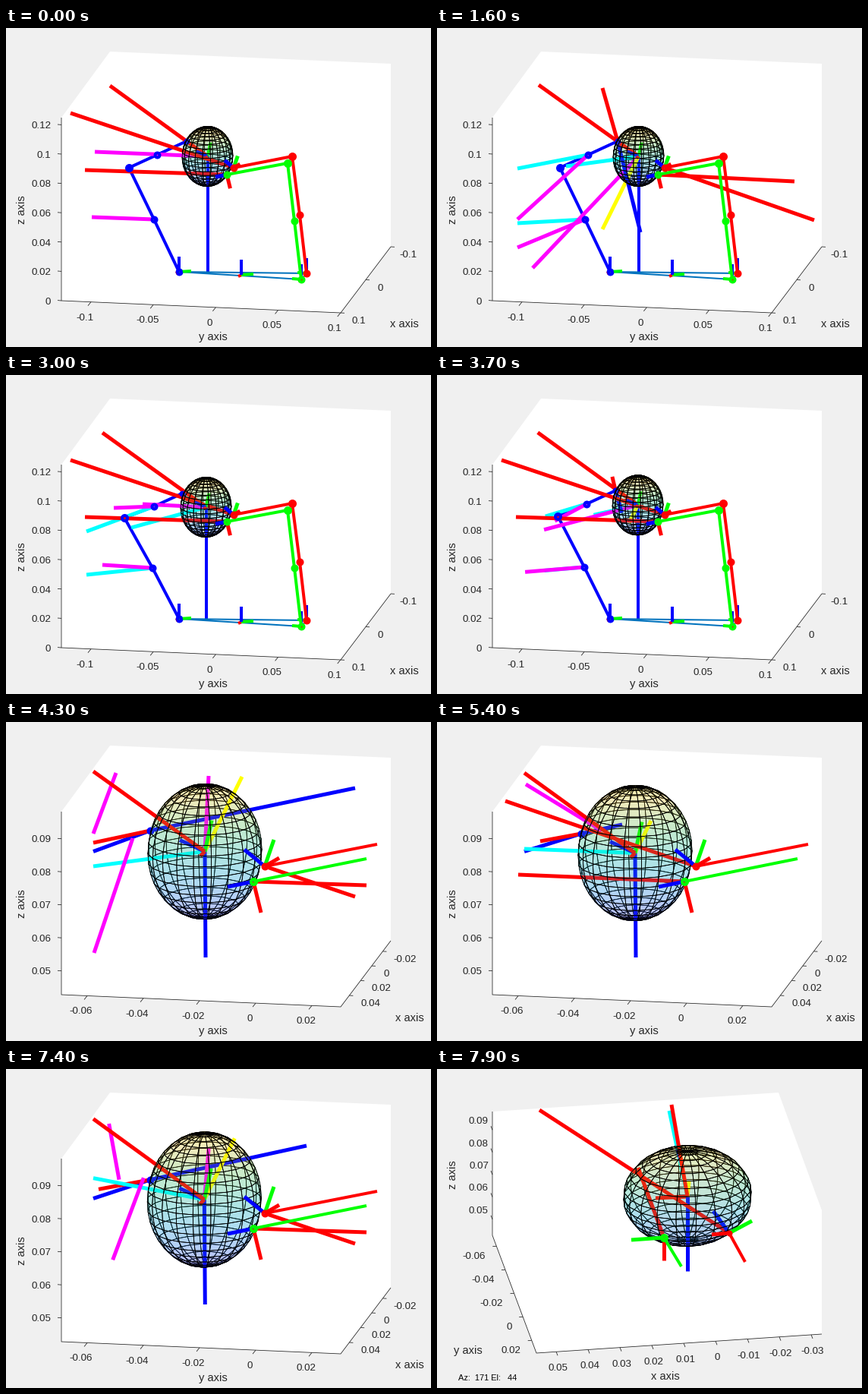
Recreate the animation shown at these times as a matplotlib script. Size 560x420 px, loop 8000 ms.

```python
import numpy as np
import matplotlib.pyplot as plt
from matplotlib.animation import FuncAnimation
from matplotlib.collections import PolyCollection
from matplotlib.lines import Line2D

W, H, DPI = 560, 420, 100
STEP, FRAMES = 100, 80
PX = 72 / DPI
INK = "#262626"
RED, GREEN, BLUE = "#ff0000", "#00ff00", "#0000ff"
MAG, CYAN, YEL, BASE = "#ff00ff", "#00ffff", "#ffff00", "#0072bd"
BACK, INSIDE, FRONT, TOP = 2, 3, 4, 5

plt.rcParams["font.family"] = "Liberation Sans"
fig = plt.figure(figsize=(W / DPI, H / DPI), dpi=DPI, facecolor="#f0f0f0")
ax = fig.add_axes([0, 0, 1, 1])

# time, strain of the vectors, side of the two cable pulls
KEYS = np.array([
    (500, 0, 0), (900, 1, 1), (1300, 0, 0), (1600, 1, 1), (2000, 0, 0),
    (2500, 1, 1), (3000, 0, 0), (3400, 1, 1), (3800, 0, 0), (4300, 1, 1),
    (4800, 0, 0), (5100, 1, 1), (5400, 0, 0), (5900, 1, 1), (6300, 0, 0),
    (6700, 1, 0), (7200, 0, 0), (7500, 1, 1), (7700, 0, 0)])
SAG = [(500, 1600, 3000, 4300, 5400, 6700, 7700), (0, 0, 1, 0, 1, 0, 1)]


def lerp(a, b, k):
    return np.asarray(a, float) * (1 - k) + np.asarray(b, float) * k


def seg(color, p, q, w=5, z=INSIDE):
    if np.hypot(p[0] - q[0], p[1] - q[1]) > 1:
        ax.add_line(Line2D([p[0], q[0]], [p[1], q[1]], color=color, lw=w * PX,
                           zorder=z, solid_capstyle="butt"))


def chain(color, pts, w=4, z=TOP):
    x, y = np.transpose(pts)
    ax.add_line(Line2D(x, y, color=color, lw=w * PX, zorder=z,
                       solid_capstyle="butt"))


def ring(color, p, d=6, z=TOP):
    ax.add_line(Line2D([p[0]], [p[1]], marker="o", ms=d * PX, mfc="none",
                       mec=color, mew=4 * PX, zorder=z))


def triad(p, arms, scale=1.0, w=5, z=TOP):
    for color, dx, dy in arms:
        seg(color, p, (p[0] + dx * scale, p[1] + dy * scale), w, z)


def label(x, y, s, ha="center", size=13.33, **kw):
    ax.text(x, y, s, ha=ha, va="baseline", fontsize=size * PX,
            color=kw.pop("color", INK), **kw)


def tick(x, y, dx, dy):
    seg(INK, (x, y), (x + dx, y + dy), 0.8, 1)


def box(corners, edge):
    ax.add_patch(plt.Polygon(corners, fc="white", ec="none", zorder=0))
    chain(INK, edge, 0.8, 1)


def axis_names(x, y, z):
    label(*x, "x axis", size=14.67)
    label(*y, "y axis", size=14.67)
    label(*z, "z axis", size=14.67, rotation=90, rotation_mode="anchor")


# unit sphere mesh
N = 20
LON, LAT = np.meshgrid(np.linspace(-np.pi, np.pi, N + 1),
                       np.linspace(-np.pi / 2, np.pi / 2, N + 1))
BALL = np.stack([np.cos(LAT) * np.cos(LON), np.cos(LAT) * np.sin(LON),
                 np.sin(LAT)], -1)
STOPS = [(.24, .15, .66), (.28, .36, .95), (.13, .6, .9), (.1, .75, .7),
         (.5, .8, .35), (.99, .75, .23), (.98, .95, .1)]
LEVEL = np.repeat(np.linspace(0, 1, N), N)
TINT = np.stack([np.interp(LEVEL, np.linspace(0, 1, len(STOPS)), c)
                 for c in np.transpose(STOPS)] + [np.full(N * N, .2)], -1)


def sphere(center, ex, ey, ez):
    p = BALL @ np.array([ex, ey, ez], float) + center
    quads = np.stack([p[:-1, :-1], p[:-1, 1:], p[1:, 1:], p[1:, :-1]], 2)
    quads = quads.reshape(-1, 4, 2)
    a, b = quads[:, 2] - quads[:, 0], quads[:, 3] - quads[:, 1]
    near = a[:, 0] * b[:, 1] - a[:, 1] * b[:, 0] < 0
    for mask, z in ((~near, BACK), (near, FRONT)):
        ax.add_collection(PolyCollection(
            quads[mask], facecolors=TINT[mask], edgecolors="none",
            antialiaseds=False, zorder=z), autolim=False)
        ax.add_collection(PolyCollection(
            quads[mask], facecolors="none", edgecolors="black",
            linewidths=.8 * PX, zorder=z + .1), autolim=False)


SIDE_BOX = [(73, 118), (137, 31), (507, 47), (507, 288), (441, 375), (73, 359)]
SIDE_EDGE = [(73, 118), (73, 359), (441, 375), (507, 288)]
R_ARMS = [(BLUE, -27, -22), (GREEN, 12, -35), (RED, 19, -11)]
G_ARMS = [(BLUE, -34, 7), (RED, 10, 41)]
C_ARMS = [(GREEN, 9, -41), (BLUE, -33, -15), (RED, -6, 6)]


def side_axes(zs, z0, kz, ys, y0, ky, xs, xname):
    """zs, ys: tick values; z0, y0: limits at the corner; xs: value, edge share, label x."""
    box(SIDE_BOX, SIDE_EDGE)
    for v in zs:
        y = 359 - (v - z0) * kz
        tick(73, y, -5, -.4)
        label(59, y + 4.8, f"{v:g}", "right")
    for v in ys:
        x = 73 + (v - y0) * ky
        y = 359 + (x - 73) * 16 / 368
        tick(x, y, -4, 5)
        label(x - 8, y + 24, f"{v:g}")
    for v, k, lx in xs:
        x, y = lerp((441, 375), (507, 288), k)
        tick(x, y, 5, .3)
        label(lx, y + 14, f"{v:g}", "left")
    axis_names((xname, 394), (273, 411), (25, 239))


def whole_arm(t, s, left, q):
    side_axes(np.arange(7) * .02, 0, 1930, (-.1, -.05, 0, .05, .1), -.1237,
              1644, [(.1, 0, 456), (0, .5, 489), (-.1, 1, 518)], 525)
    c = lerp((265.5, 169), (263.5, 174), q)
    sphere(c, (-6.6, 8.7), (33, 1.4), (0, -38.6))

    n1 = lerp((238, 149), (232, 156), q)
    n2 = lerp((199, 167), (195, 173), q)
    n3 = lerp((162, 184), (156, 188), q)
    n4 = lerp((195, 252), (193, 254), q)
    foot, right, low = (228, 321), (396, 323), (389, 331)
    r, g = (300, 184), (291, 193)

    seg(BLUE, c, (c[0], 321), 4)
    chain(BLUE, [n1, n2, n3, n4, foot], 4, INSIDE)
    rays = [  # colour, joint, slack ends, tense end
        (CYAN, n2, n2, (106, 206), (106, 185)),
        (CYAN, n4, n4, (106, 263), (106, 257)),
        (CYAN, c, c, (165, 201), (170, 182)),
        (MAG, n2, n2, (142, 175), (106, 252)),
        (MAG, n4, (113, 249), (127, 250), (106, 289)),
        (MAG, c, (117, 163), (180, 170), (126, 316)),
        (YEL, c, c, c, (218, 265)),
        (BLUE, n1, n1, n1, (268, 269)),
        (RED, n1, n1, n1, (218, 79)),
        (RED, c, (137, 76), (127, 76), (134, 75))]
    for color, joint, rest0, rest1, tense in rays:
        seg(color, joint, lerp(lerp(rest0, rest1, q), tense, s))
    seg(RED, r, (85, 112) if left else (497, 253))
    seg(RED, g, (104, 187) if left else (471, 202))
    for p, d in ((n1, 4), (n2, 6), (n3, 7), (n4, 6), (foot, 6)):
        ring(BLUE, p, d, INSIDE)

    triad(c, C_ARMS, .444, 4, INSIDE)
    triad(r, R_ARMS, .444)
    triad(g, G_ARMS, .444)
    chain(BASE, [low, foot, right, low], 2)
    for p in (foot, (310, 325), right, low):
        seg(RED, (p[0] - 4, p[1] + 2), (p[0] + 3, p[1] - 1), 4, TOP)
        seg(GREEN, p, (p[0] + 16, p[1] - 1) if p[0] < 350 else
            (p[0] - 12, p[1] - 1), 4, TOP)
        seg(BLUE, p, (p[0], p[1] - 20), 4, TOP)
    ring(BLUE, foot, 5)
    chain(RED, [r, (377, 169), (387, 246), right])
    chain(GREEN, [g, (371, 178), (380, 254), low])
    for color, pts in ((RED, [r, (377, 169), (387, 246), right]),
                       (GREEN, [g, (371, 178), (380, 254), low])):
        for p, d in zip(pts, (6, 7, 6, 6)):
            ring(color, p, d)


def close_up(t, s, left, q):
    side_axes((.05, .06, .07, .08, .09), .0428, 4350,
              (-.06, -.04, -.02, 0, .02), -.0692, 3700,
              [(.04, .172, 467), (.02, .397, 482), (0, .62, 497),
               (-.02, .84, 510)], 532)
    c = lerp((262, 170.5), (261, 172.5), q)
    sphere(c, (-15, 20), (74, 3.2), (0, -87))

    late = np.clip((t - 4300) / 2400, 0, 1)
    n1 = lerp((190, 143), (190, 147), q)
    r, g = (341, 190), (326, 210)
    seg(BLUE, n1, (115, 170.5))
    seg(RED, n1, lerp((136, 157), (115, 159), s))
    seg(BLUE, n1, lerp((244, 135), lerp((460, 87), (472, 84), late), s))
    seg(CYAN, c, (115, 167 + (lerp(190, 132, late) - 167) * s))
    seg(YEL, c, lerp((282, 130), (311, 72), s))
    seg(MAG, c, lerp(c, lerp((267, 71), (270, 71), late), s))
    seg(MAG, lerp((117, 82), (145, 67), s), lerp((217, 143), (115, 147), s))
    seg(MAG, lerp(n1, (116, 304), s),
        lerp(n1, lerp((167, 153), (177, 142), late), s))
    ring(BLUE, n1, 6, INSIDE)
    seg(BLUE, c, (c[0] + 1, 310))
    triad(c, C_ARMS, z=INSIDE)
    seg(RED, c, lerp((115, 67), (115, 65), s))
    seg(RED, r, (90, 104) if left else (460, 230))
    seg(RED, g, (107, 201) if left else (475, 215))

    triad(r, R_ARMS)
    triad(g, G_ARMS)
    seg(RED, r, (489, 161), 4, TOP)
    seg(GREEN, g, (475, 180), 4, TOP)
    ring(RED, r, 6)
    ring(GREEN, g, 7)


def turned():
    box([(73, 56), (450, 31), (507, 186), (507, 349), (131, 374), (73, 219)],
        [(73, 56), (73, 219), (131, 374), (507, 349)])
    for v in (.05, .06, .07, .08, .09):
        y = 219 - (v - .0428) * 2940
        tick(73, y, -2, -5)
        label(68, y - 8, f"{v:g}", "right")
    for v in (-.06, -.04, -.02, 0, .02):
        x, y = 73 + (v + .0692) * 580, 219 + (v + .0692) * 1550
        tick(x, y, -5, .4)
        label(x - 14.5, y + 16.5, f"{v:g}", "right")
    for i in range(5, -4, -1):
        d = (.0562 - i / 100) * 4200
        x, y = 131 + d, 374 - d * 25 / 376
        tick(x, y, 2, 5)
        label(x + 2, y + 25, f"{i / 100:g}")
    axis_names((301, 409), (41, 375), (25, 139))
    label(28, 410, "Az:  171 El:   44", "left", 11, color="black")

    c, g, r = (330, 168), (299, 222), (385, 216)
    sphere((330, 167), (-84, 5.6), (11.5, 31), (0, -58.8))
    seg(CYAN, (306, 55), c)
    seg(BLUE, (317, 106), (323, 126))
    seg(YEL, (332, 148), c)
    seg(RED, (309, 47), c)
    seg(RED, (288, 170), c)
    seg(BLUE, c, (330, 266))
    seg(RED, (265, 130), g)
    seg(RED, (135, 54), r)
    seg(BLUE, (364, 187), r)
    triad(g, [(RED, 0, 30), (GREEN, -43, 3)])
    seg(GREEN, g, (322, 260), 4, TOP)
    triad(r, [(RED, -23, 2), (GREEN, 30, -16)])
    seg(RED, r, (406, 254), 4, TOP)
    ring(GREEN, g, 7)
    ring(RED, r, 4)


def draw(i):
    t = i * STEP
    ax.clear()
    ax.set(xlim=(0, W), ylim=(H, 0))
    ax.axis("off")
    strain = np.interp(t, KEYS[:, 0], KEYS[:, 1])
    left = np.interp(t, KEYS[:, 0], KEYS[:, 2]) < .55
    sag = np.interp(t, *SAG)
    if t < 4200:
        whole_arm(t, strain, left, sag)
    elif t < 7800:
        close_up(t, strain, left, sag)
    else:
        turned()
    return []


anim = FuncAnimation(fig, draw, frames=FRAMES, interval=STEP,
                     init_func=lambda: draw(0), repeat=True, repeat_delay=0)
plt.show()
```
